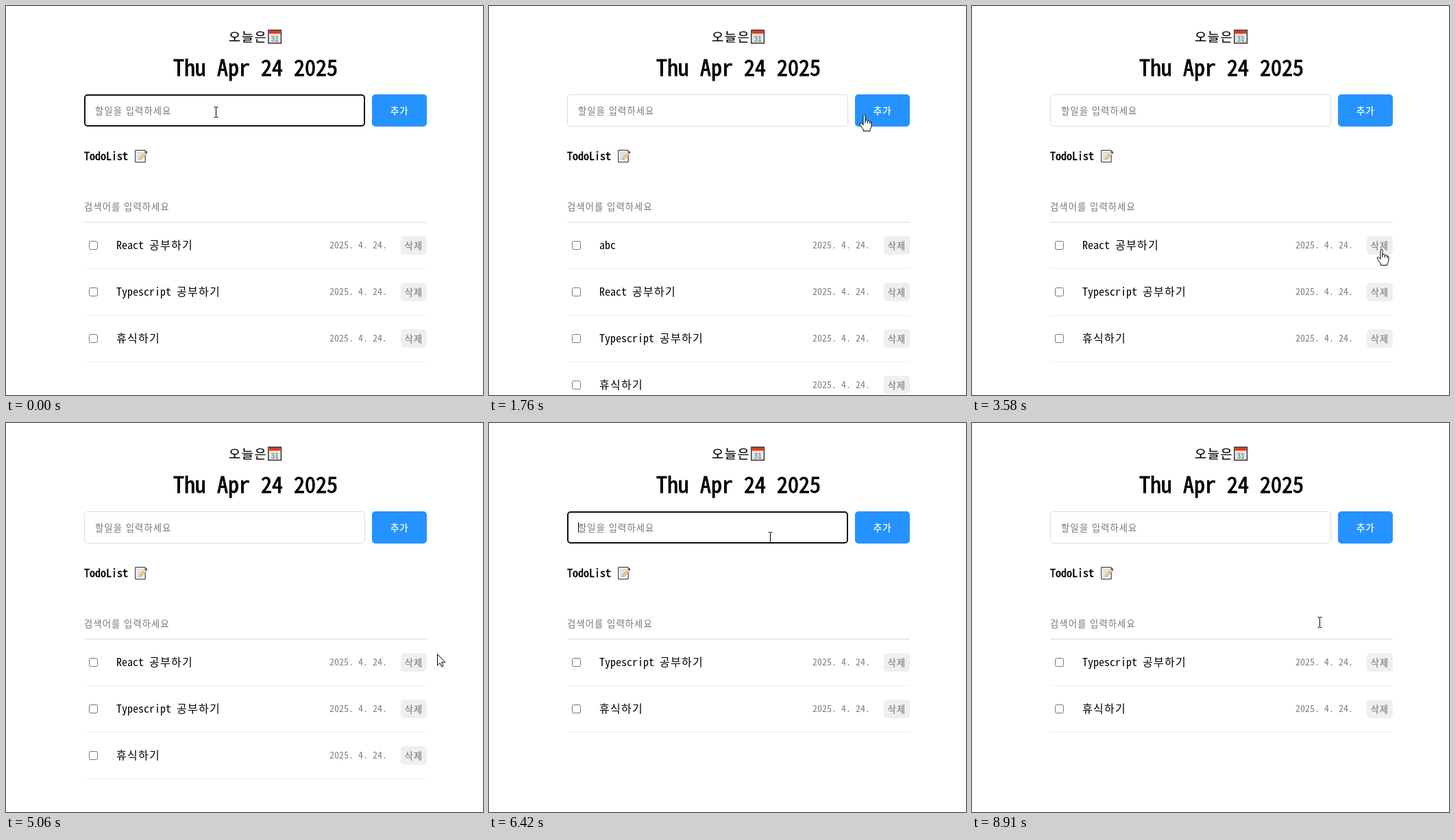
Animation, 696 px wide and 568 px high, one loop 9.27 s. Source, as an HTML page:

```html
<!DOCTYPE html>
<html lang="ko">
<head>
<meta charset="utf-8">
<title>TodoList</title>
<style>
  html, body { margin: 0; width: 100%; height: 100%; overflow: hidden; background: #fff; }
  svg { display: block; font-family: "Noto Sans Mono CJK KR", "Noto Sans CJK KR", "Noto Sans CJK", monospace; }
  text { white-space: pre; }
  .ko { letter-spacing: .08em; }
  .ui { font: 13.33px "Noto Sans CJK KR", "Noto Sans CJK", sans-serif; letter-spacing: .08em; }
  .hint { fill: #757575; }
  .add { fill: #fff; stroke: #fff; stroke-width: .3px; }
  .del { fill: #808080; stroke: #808080; stroke-width: .2px; }
  .date { font-size: 14px; fill: #808080; }
  .typed { font: 13.33px "Liberation Sans", sans-serif; }
</style>
</head>
<body>
<svg width="696" height="568" viewBox="0 0 696 568">
  <text class="ko" x="325" y="51.5" font-size="18.72" stroke="#000" stroke-width=".2">오늘은</text>
  <g transform="translate(382 34)">
    <rect x=".8" y="1.3" width="18.6" height="19" fill="#eee" stroke="#333" stroke-width="1.5"/>
    <path d="M1.6 2h17v4.5h-17z" fill="#e4391f"/>
    <path d="M3.5 8.5h13v10h-13z" fill="#dbe0de"/>
    <text x="10.2" y="17.6" font-size="11" text-anchor="middle" fill="#68736f">31</text>
  </g>
  <text x="364" y="102" font-size="32" text-anchor="middle" stroke="#000" stroke-width=".9">Thu Apr 24 2025</text>

  <rect x="534" y="129" width="80" height="47" rx="5" fill="#2593ff"/>
  <text class="ui add" x="561" y="158">추가</text>

  <text x="114" y="225" font-size="16" stroke="#000" stroke-width=".5">TodoList</text>
  <g transform="translate(188 210)">
    <path d="M.7 .7h14.5v17.3h-14.5z" fill="#f4f4f4" stroke="#222"/>
    <path d="M3 4.5h9M3 7.5h8M3 10.5h5M3 13.5h3" stroke="#bbb"/>
    <path d="M6.5 14.5l1-3.5 7.5-7.5 2.5 2.5-7.5 7.5z" fill="#f3cf78" stroke="#777" stroke-width=".5"/>
    <path d="M15 3.3l1.5-1.5 2 2-1.3 1.7z" fill="#444"/>
  </g>

  <text class="ui hint" x="114" y="298">검색어를 입력하세요</text>
  <path d="M114 315.5h500" stroke="#dcdcdc"/>
  <g id="field"></g>
  <g id="list"></g>
  <g id="cursor"></g>
</svg>
<script>
const LOOP = 9270, BLINK = 530;

// Two typing sessions: focus the input, type at a steady pace, press add
const sessions = [
  { focus: 60, type: 580, pace: 160, add: 1600, remove: 3550 },
  { focus: 6420, type: 6500, pace: 110, add: 7120, remove: 8360 }
];
const NEW = 'abc', reactRemoved = 5520;

// Pointer moves between named spots, some bowed towards a point
const spot = { field: [306, 155], left: [452, 164], right: [410, 167], add: [575, 157], del: [598, 355], search: [507, 291] };
const moves = [
  { start: 950, end: 1290, to: spot.add },
  { start: 1670, end: 1970, to: spot.left },
  { start: 2120, end: 2970, to: spot.del, bow: [643, 243] },
  { start: 4700, end: 5330, to: spot.del, bow: [663, 317] },
  { start: 5880, end: 6240, to: spot.right },
  { start: 6720, end: 6940, to: spot.add },
  { start: 7120, end: 7940, to: spot.del, bow: [408, 51] },
  { start: 8700, end: 8910, to: spot.search }
];

const shapes = {
  beam: '<path d="M-3 -7.5h2.5m1 0h2.5M0 -7v14M-3 7.5h2.5m1 0h2.5" transform="translate(.5 0)" stroke="#000" fill="none"/>',
  arrow: '<path d="M.5 .5V17L4.2 13.4L6.7 19L9 18L6.6 12.4H11.7Z" fill="#fff" stroke="#000"/>',
  hand: '<path d="M-2 1.5a1.5 1.5 0 0 1 3 0V8q3-1.6 3.5 .8q3-1 3.3 1q2.2-.4 2.2 2V16q0 3-2 5v2.5H-2V21L-6.5 14.5q-1-2.2 .8-2.8q1.5 0 3.7 3zM1 8v4M4.5 9v3.5M7.8 10v3" fill="#fff" stroke="#000"/>'
};

const $ = id => document.getElementById(id);
const clamp = p => Math.min(1, Math.max(0, p));
const ease = p => p * p * (3 - 2 * p);
const inside = (x, y, l, t, r, b) => x >= l && x <= r && y >= t && y <= b;
const spaced = s => s.replace(/[가-힣]+/g, '<tspan class="ko">$&</tspan>');

function itemsAt(t) {
  const items = ['Typescript 공부하기', '휴식하기'];
  if (t < reactRemoved) items.unshift('React 공부하기');
  if (sessions.some(s => t >= s.add && t < s.remove)) items.unshift(NEW);
  return items;
}

function row(text, i) {
  return `<g transform="translate(0 ${i * 68})">
    <rect x="121.5" y="343.5" width="12" height="12" rx="2" fill="#fff" stroke="#767676"/>
    <text x="161" y="354.5" font-size="16">${spaced(text)}</text>
    <text class="date" x="472" y="354">2025. 4. 24.</text>
    <rect x="576" y="336" width="38" height="27" rx="5" fill="#efefef"/>
    <text class="ui del" x="581.7" y="354.5">삭제</text>
    <path d="M114 383.5h500" stroke="#f0f0f0"/></g>`;
}

function field(t) {
  const s = sessions.find(s => t >= s.focus && t < s.add);
  const count = s ? Math.min(NEW.length, Math.max(0, Math.floor((t - s.type) / s.pace) + 1)) : 0;
  const lastKey = s && (count ? s.type + (count - 1) * s.pace : s.focus);
  const caretOn = s && (t - lastKey) % (2 * BLINK) < BLINK;
  const frame = s || t < sessions[0].focus
    ? '<rect x="115" y="130" width="408" height="45" rx="4" fill="#fff" stroke="#101010" stroke-width="2"/>'
    : '<rect x="114.5" y="129.5" width="409" height="46" rx="4.5" fill="#fff" stroke="#dcdcdc"/>';
  const text = count
    ? `<text class="typed" x="130" y="157.5">${NEW.slice(0, count)}</text>`
    : '<text class="ui hint" x="130" y="158">할일을 입력하세요</text>';
  return frame + text + (caretOn ? `<path d="M${130.5 + 7 * count} 145v15" stroke="#000"/>` : '');
}

function pointerAt(t) {
  let from = spot.field;
  for (const { start, end, to, bow } of moves) {
    if (t < start) break;
    const p = ease(clamp((t - start) / (end - start))), q = 1 - p;
    from = from.map((a, i) => {
      const c = bow ? bow[i] : (a + to[i]) / 2;
      return q * q * a + 2 * p * q * c + p * p * to[i];
    });
  }
  return from.map(Math.round);
}

function pointer(t, count) {
  const [x, y] = pointerAt(t);
  const line = Math.floor((y - 316) / 68), top = 336 + line * 68;
  const onDelete = line >= 0 && line < count && inside(x, y, 576, top, 614, top + 27);
  let kind = 'arrow';
  if (onDelete || inside(x, y, 534, 129, 614, 176)) kind = 'hand';
  else if (inside(x, y, 114, 129, 524, 192) || inside(x, y, 114, 272, 614, 315)) kind = 'beam';
  return `<g transform="translate(${x} ${y})">${shapes[kind]}</g>`;
}

const begin = performance.now();
function draw() {
  const t = (performance.now() - begin) % LOOP;
  const items = itemsAt(t);
  $('list').innerHTML = items.map(row).join('');
  $('field').innerHTML = field(t);
  $('cursor').innerHTML = pointer(t, items.length);
  requestAnimationFrame(draw);
}
draw();
</script>
</body>
</html>
```
